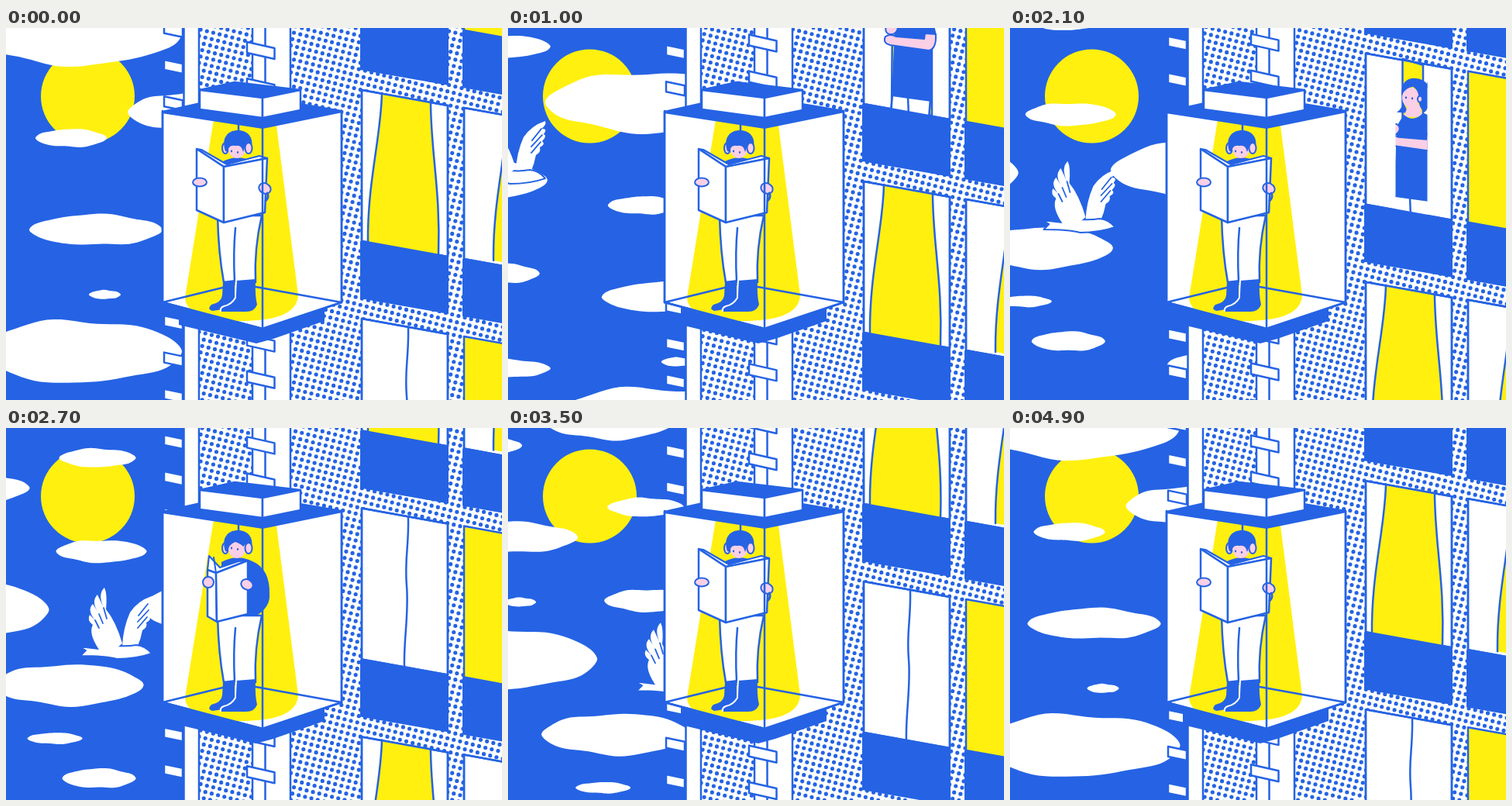
An HTML page with a canvas that plays this animation: 640 by 480 pixels, repeating every 5000 ms.

```html
<!DOCTYPE html>
<html lang="en">
<head>
<meta charset="utf-8">
<title>Glass elevator</title>
<style>
  html, body { margin: 0; width: 100%; height: 100%; overflow: hidden; background: #2563e4; }
  canvas { display: block; }
</style>
</head>
<body>
<canvas id="stage" width="640" height="480"></canvas>
<script>
const ctx = document.getElementById('stage').getContext('2d');
const BLUE = '#2563e4', YELLOW = '#fff00f', WHITE = '#fff', PINK = '#fbcfe6';
const LOOP = 5000, STEP = 100, FLOOR = 295;

const lerp = (a, b, k) => a + (b - a) * k;
const ramp = (t, a, b) => {
  const k = Math.min(1, Math.max(0, (t - a) / (b - a)));
  return k * k * (3 - 2 * k);
};

function shape(d, fill, line = BLUE, width = 2.5) {
  const path = d instanceof Path2D ? d : new Path2D(d);
  if (fill) { ctx.fillStyle = fill; ctx.fill(path); }
  if (line) { ctx.strokeStyle = line; ctx.lineWidth = width; ctx.stroke(path); }
}

function oval(x, y, rx, ry, fill, line, turn = 0) {
  const path = new Path2D();
  path.ellipse(x, y, rx, ry, turn, 0, 7);
  shape(path, fill, line, 2);
}

const poly = (pts, fill, line, width) => shape('M' + pts.join('L') + 'Z', fill, line, width);

function at(x, y, draw) {
  ctx.save();
  ctx.translate(x, y);
  draw();
  ctx.restore();
}

// ---- Sky ----
// left, right, top, bottom at time 0
const clouds = [
  [-43, 226, -31, 49], [157, 330, 82, 135], [38, 130, 130, 154], [30, 202, 240, 281],
  [107, 148, 338, 350], [-39, 227, 376, 459], [-153, -36, -78, -48], [-234, -40, 82, 137],
  [-190, -119, 171, 186], [-145, -50, 217, 243], [-160, -36, 340, 365], [-149, -50, -196, -171]
].map(([l, r, top, bottom], seed) => {
  const path = new Path2D();
  for (let i = 0; i < 90; i++) {
    const a = i / 90 * Math.PI * 2, s = Math.sin(a);
    const bump = 0.96 + 0.06 * Math.sin(5 * a + seed) + 0.03 * Math.sin(8 * a + seed * 2);
    path.lineTo((l + r) / 2 + (r - l) / 2 * Math.cos(a),
      (top + bottom) / 2 + (bottom - top) / 2 * Math.sign(s) * Math.abs(s) ** 1.15 * bump);
  }
  path.closePath();
  return path;
});

function drawClouds(t) {
  const a = Math.min(1, t / 600), b = Math.max(0, (t - 600) / 4400);
  const x = 61 * a + 328 * b, y = 55 * a + 350 * b;
  for (const lap of [0, 1])
    at(x - 389 * lap, y - 405 * lap, () => clouds.forEach(c => shape(c, WHITE, null)));
}

function drawBird(t) {
  const k = t < 1500 ? (t - 600) / 900 : (t - 1500) / 1200;
  const x = t < 1500 ? lerp(20, 83, k) : lerp(83, 188, k);
  const y = t < 1500 ? lerp(170, 222, k) : lerp(222, 290, k);
  at(x, y, () => {
    // far wing
    shape('M-38-8Q-37-32-28-52Q-18-67 0-73Q2-68-5-63Q4-64-2-56Q3-54-4-47Q1-43-7-39Q-5-33-12-29Q-14-18-18-9Z', WHITE, null);
    // body
    shape('M0 1Q-8-9-20-10Q-32-8-42-9Q-58-8-68-5L-94-8L-85-3L-92 4Q-60 4-45 8Q-20 8 0 1Z', WHITE, BLUE, 2);
    // near wing
    shape('M-68-4Q-82-25-76-36Q-84-42-80-49L-73-42Q-84-55-76-63L-68-50Q-79-66-70-75L-62-58Q-70-76-61-84Q-57-76-59-56Q-46-40-38-12Q-52 2-68-4Z', WHITE, null);
    shape('M-73-42L-68-32M-68-50L-63-38M-62-58L-58-44M-5-63L-17-48M-4-55L-18-40M-6-46L-18-32', null, BLUE, 1.8);
  });
}

function rungs(x0, x1, drop, height, y, gap) {
  for (let top = y % gap - gap; top < 480; top += gap)
    poly([[x0, top], [x1, top + drop], [x1, top + drop + height], [x0, top + height]], WHITE);
}

// ---- Facade ----
const DOT_PERIOD = 2 * FLOOR / 17, dots = new Path2D();
{
  const k = DOT_PERIOD / 17;
  for (let u = -10; u < 160; u++)
    for (let v = -60; v < 80; v++) {
      const x = k * (4 * u - v), y = k * (u + 4 * v);
      if (x < 245 || x > 645 || y < -40 || y > 485) continue;
      dots.moveTo(x + 2.6, y);
      dots.arc(x, y, 2.6, 0, 7);
    }
}

const pane = (fill, line) => poly([[459, 0], [570, 20], [570, 215], [459, 195]], fill, line);
const sill = () => poly([[457, 195], [571, 215], [571, 289], [457, 269]], BLUE, null);

function openCurtain() {
  shape('M485 4C484 60 466 120 467 197L558 213C561 130 548 80 548 15Z', YELLOW, null);
  shape('M485 4C484 60 466 120 467 197M558 213C561 130 548 80 548 15', null);
}

function woman() {
  shape('M496 145L494 170M516 148L517 172M545 150L543 176', WHITE);
  shape('M496 145H545L543 176L494 168Z', WHITE, null);
  shape('M496 145L494 170M516 148L517 172M545 150L543 176', null);
  oval(543, 3, 6, 6, BLUE, null);
  shape('M507 24Q506 34 499 38L514 39Z', BLUE, null);
  shape('M514 28L529 28L532 44L508 44Z', PINK, null);
  oval(517, 19, 11, 13, PINK, null);
  shape('M505 17Q504-6 522-6Q541-5 542 14Q543 30 535 38Q527 32 527 20Q528 10 520 5Q510 6 505 17Z', BLUE, null);
  oval(529, 21, 3, 4, PINK, BLUE);
  oval(511, 19, 1.2, 1.5, BLUE, null);
  oval(519, 20, 1.2, 1.5, BLUE, null);
  shape('M508 41Q520 52 533 39Q548 43 551 60L553 68L546 90L546 154L495 147L498 82L499 56Z', BLUE, null);
  shape('M538 66L552 67Q553 86 543 88L493 81Q483 78 487 70Q493 66 501 70L537 73Z', PINK, BLUE, 2);
  oval(495, 60, 8, 7, PINK, BLUE, -0.6);
}

function womanWindow(closed) {
  pane(WHITE);
  if (closed < 1) {
    const l = lerp(478, 517, closed), r = lerp(558, 519, closed);
    const gl = lerp(496, 517, closed), gr = lerp(547, 519, closed);
    shape(`M${gl} 7L${gl} 80L${gl - 1} 202L${gr} 210L${gr} 80L${gr} 15Z`, YELLOW);
    ctx.save();
    ctx.beginPath();
    ctx.rect(l, 0, r - l, 230);
    ctx.clip();
    at(0, 38, woman);
    ctx.restore();
  } else {
    shape('M519 11C520 50 514 65 517 100S513 170 514 205', null);
  }
  pane(null);
  sill();
  at(132, 23, () => { pane(YELLOW); sill(); });
}

function curtainWindow() {
  pane(WHITE);
  openCurtain();
  pane(null);
  sill();
  at(132, 23, () => {
    pane(WHITE);
    at(30, 0, openCurtain);
    pane(null);
    sill();
  });
}

function drawBuilding(t) {
  const scroll = t / LOOP * 2 * FLOOR, top = scroll + 80;
  ctx.fillStyle = WHITE;
  ctx.fillRect(230, 0, 410, 480);
  at(0, scroll % DOT_PERIOD, () => shape(dots, BLUE, null));

  for (const floor of [0, -2]) at(0, top + floor * FLOOR, curtainWindow);
  at(0, top - 3 * FLOOR, () => womanWindow(0));
  at(0, top - FLOOR, () => womanWindow(ramp(t, 1800, 2400)));
  at(0, top + FLOOR, () => womanWindow(1));

  ctx.fillStyle = WHITE;
  ctx.fillRect(230, 0, 19, 480);
  ctx.fillRect(318, 0, 49, 480);
  shape('M229.5 0V480M249 0V480M318 0V480M334.5 0V480M367 0V480', null);
  rungs(204, 228, 5, 13, 41 + t / LOOP * 8 * 47.2, 47.2);
  rungs(311, 346.5, 8, 14, 18 + t / LOOP * 9 * 47.2, 47.2);
}

// ---- Elevator ----
function drawMan(fold) {
  const p = (x0, y0, x1, y1) => [lerp(x0, x1, fold), lerp(y0, y1, fold)];

  // legs and boots
  shape('M273 242Q274 290 281 328H322Q320 285 330 242Z', WHITE);
  shape('M296 258Q293 290 295 327', null);
  shape('M280 327L295 325V350Q290 363 266 365Q259 362 265 357Q278 354 279 345Z', BLUE, null);
  shape('M297 326L322 324Q321 345 324 357Q320 367 308 366H277Q276 360 284 358Q297 353 297 345Z', BLUE, null);
  shape('M297 326Q296 340 296 348Q291 357 281 359Q276 361 277 365', null, WHITE, 2);

  // torso and head
  const side = lerp(331, 341, fold);
  shape(`M278 173Q298 162 318 172Q${side} 182 ${side - 1} 215Q${side} 230 325 241L278 245Z`, BLUE, null);
  oval(283, 155, 4, 7, PINK, BLUE);
  oval(298, 156, 11, 12, PINK, null);
  shape(`M283 159C277 140 288 132 299 132C313 132 319 142 317 153L309 ${lerp(152, 150, fold)}L306 ${lerp(160, 153, fold)}Q304 150 296 ${lerp(152, 147, fold)}Q287 150 286 160Z`, BLUE, null);
  oval(313, 155, 4.5, 7, PINK, BLUE);
  const eye = lerp(159, 155, fold);
  oval(291, eye, 1.1, 1.4, BLUE, null);
  oval(299, eye + 1.5, 1.1, 1.4, BLUE, null);

  // newspaper
  const top = p(281, 179, 271, 187), foot = p(281, 251, 272, 250);
  const left = p(246, 156, 260, 183), right = p(337, 168, 312, 171);
  poly([left, p(252, 157, 262, 165), p(285, 176, 276, 180), p(327, 165, 300, 172), right, top], WHITE, BLUE, 2.2);
  shape(`M${p(254, 163, 268, 167)}L${top}`, null, BLUE, 2);
  poly([left, top, foot, p(246, 235, 260, 243)], WHITE);
  poly([top, right, p(334, 238, 312, 240), foot], WHITE);

  // hands
  oval(...p(250, 199, 261, 199), lerp(9, 7, fold), lerp(5.5, 7, fold), PINK, BLUE);
  oval(...p(334, 207, 311, 202), 8, 6.5, PINK, BLUE, 0.5);
  if (fold < 0.5) shape('M337 213Q340 218 335 223', null, BLUE, 3);
}

function drawElevator(t) {
  // cabin
  poly([[202, 108], [331, 128], [433, 107], [433, 354], [331, 388], [202, 354]], WHITE);
  shape('M268 118L231 348C232 370 265 378 304 378S376 370 377 345L348 118Z', YELLOW, null);
  shape('M300 118V330M202 354L300 330L433 354', null);

  drawMan(ramp(t, 2100, 2500) - ramp(t, 2900, 3300));

  shape('M331 125V388M202 107V354M433 107V354', null);

  // base
  poly([[223, 360], [331, 388], [411, 362], [411, 378], [345, 401], [323, 407], [223, 383]], BLUE, null);
  shape('M202 354L331 388L433 354', null);

  // roof
  poly([[201, 107], [250, 96], [380, 97], [434, 106], [434, 109], [331, 130], [201, 110]], BLUE, null);
  poly([[250, 80], [295, 70], [380, 80], [331, 90]], BLUE);
  poly([[250, 80], [331, 90], [331, 116], [250, 105]], WHITE);
  poly([[331, 90], [380, 80], [380, 106], [331, 116]], WHITE);
}

let last = -1;
function frame(now) {
  const t = Math.floor(now % LOOP / STEP) * STEP;
  if (t !== last) {
    last = t;
    ctx.lineJoin = ctx.lineCap = 'round';
    ctx.fillStyle = BLUE;
    ctx.fillRect(0, 0, 640, 480);
    oval(105.5, 88, 60.5, 60.5, YELLOW, null);
    drawClouds(t);
    if (t < 4200) drawBird(t);
    drawBuilding(t);
    drawElevator(t);
  }
  requestAnimationFrame(frame);
}
frame(performance.now());
</script>
</body>
</html>
```
